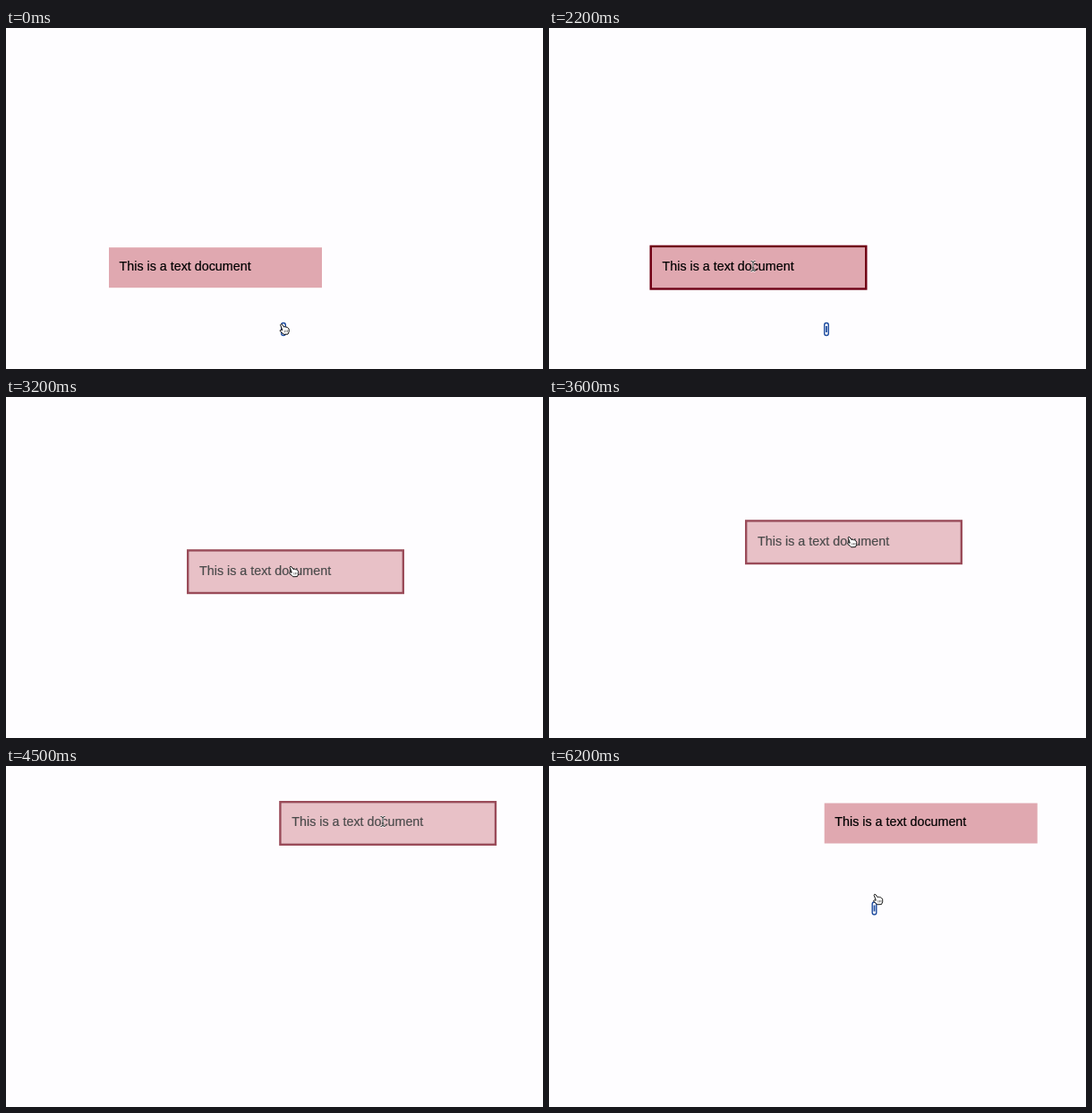
Write an HTML page that moves like this. It is 600 px wide and 381 px high and loops after 6.3 s.

```html
<!DOCTYPE html>
<html lang="en">
<head>
<meta charset="utf-8">
<title>Dragging a text box</title>
<style>
  html, body { margin: 0; width: 100%; height: 100%; overflow: hidden; background: #fefdff; }
  svg { display: block; width: 100vw; height: 100vh; }
  text { font: 14.3px "Liberation Sans", Arial, sans-serif; stroke: #000; stroke-width: .2px; }
</style>
</head>
<body>
<svg viewBox="0 0 600 381">
  <g id="box">
    <rect x="115" y="245.2" width="238" height="45" fill="#e0a8b0"/>
    <rect id="outline" fill="none"/>
    <text x="126.6" y="271">This is a text document</text>
  </g>
  <g id="clip" fill="none" stroke="#1c4a9e" stroke-width="1.4">
    <rect x="-2.3" y="-7" width="4.6" height="14" rx="2.3" fill="#fefdff"/>
    <path d="M0-3.5V3.5" stroke-width="1.7"/>
  </g>
  <g id="hand" stroke="#111" stroke-linejoin="round">
    <path fill="#fff" d="M-4.4-4.8Q-3.9-6.3-2.6-5.4L-.4-2.4Q1-3.4 1.8-2.3 3.3-2.8 3.8-1.4 5.1-1.2 5.2.4V2.8L4 5.6-.8 5.8Q-1.8 4.4-4.6 2.5-5.4 1-3.8.8L-2.2 1.2Z"/>
    <path fill="none" stroke-width=".5" d="M.2 1.2l.3 2.4M1.9 1l.2 2.4M3.5 1v2.2"/>
  </g>
  <g id="beam" fill="none">
    <g stroke="#fff" stroke-width="2.2"><use href="#beamLine"/></g>
    <g stroke="#222"><path id="beamLine" d="M-2.5-5.5Q0-5.5 0-4 0-5.5 2.5-5.5M0-4V4M-2.5 5.5Q0 5.5 0 4 0 5.5 2.5 5.5M-1.3 2H1.3"/></g>
  </g>
</svg>
<script>
const LOOP = 6300, TICK = 100;
const HOME = [0, 0], PAUSE = [89.5, -72.5], DROP = [192.7, -203.7];
const $ = id => document.getElementById(id);

const ramp = (t, from, to) => Math.min(1, Math.max(0, (t - from) / (to - from)));
const mix = (a, b, k) => a.map((v, i) => v + (b[i] - v) * k);

// Speeds up towards the middle point, then slows down to the end.
function glide(t, start, end, from, to, mid = mix(from, to, .5)) {
  const p = 2 * ramp(t, start, end);
  return p < 1 ? mix(from, mid, p * p) : mix(mid, to, 1 - (2 - p) ** 2);
}

function boxShift(t) {
  return t < 3200
    ? glide(t, 2400, 3200, HOME, PAUSE, [44, -23])
    : glide(t, 3200, 4000, PAUSE, DROP, [106.5, -105.5]);
}

function pointer(t, [dx, dy]) {
  if (t < 2500) return glide(t, 1200, 1700, [311, 336.5], [228, 266]);
  if (t < 4200) return [232 + dx, 267.5 + dy];
  if (t < 6200) return glide(t, 4800, 5400, [421, 62], [364.5, 158]);
  return [367.5, 149];
}

function place(id, [x, y], shown = true) {
  $(id).setAttribute("transform", `translate(${x} ${y})`);
  $(id).style.display = shown ? "" : "none";
}

function setOutline(k) {
  const w = 2.5 * k;
  const attrs = {
    x: 115 - w / 2, y: 245.2 - w / 2, width: 238 + w, height: 45 + w,
    "stroke-width": w, stroke: `rgb(${112 * k},0,${20 * k})`
  };
  for (const name in attrs) $("outline").setAttribute(name, attrs[name]);
}

function draw(now) {
  const t = Math.floor((now % LOOP) / TICK) * TICK;
  const shift = boxShift(t);
  place("box", shift);
  $("box").setAttribute("opacity", 1 - .3 * (ramp(t, 2400, 2700) - ramp(t, 4500, 4800)));
  setOutline(ramp(t, 1500, 1700) - ramp(t, 5300, 5500));

  const overText = (t >= 1700 && t < 2500) || (t >= 4200 && t < 4900);
  const at = pointer(t, shift);
  place("hand", at, !overText);
  place("beam", at, overText);

  const early = t < 2300;
  place("clip", early ? [310, 336.5] : [363.5, 159], early || t >= 5800);
}

const start = performance.now();
function loop() {
  draw(performance.now() - start);
  requestAnimationFrame(loop);
}
loop();
</script>
</body>
</html>
```
